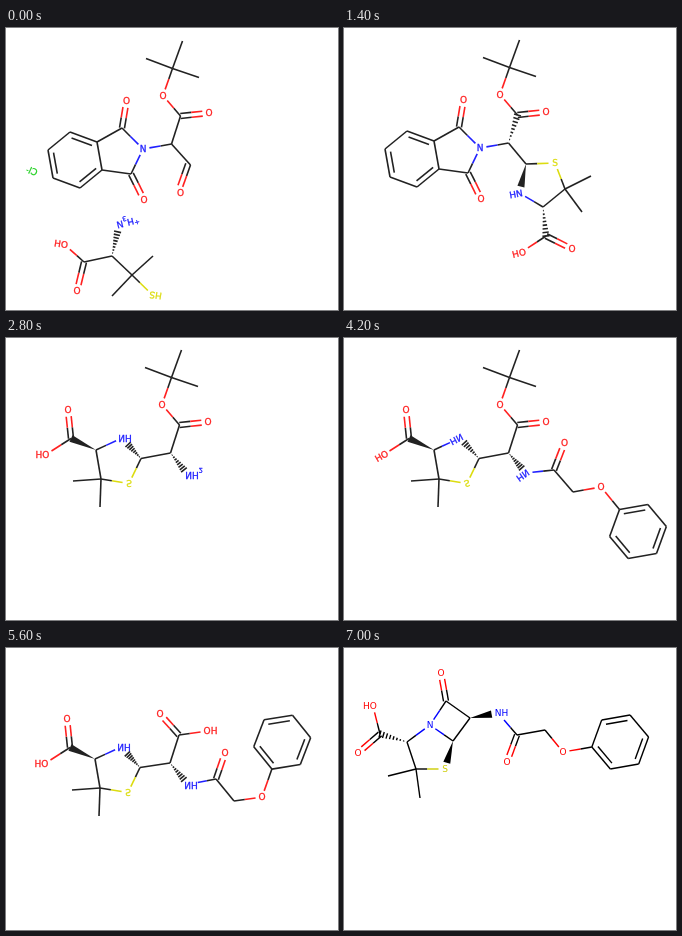
Write an HTML page that moves like this. It is 332x282 px and loops after 8400 ms.

```html
<!DOCTYPE html>
<html lang="en">
<head>
<meta charset="utf-8">
<title>Synthesis steps</title>
<style>
  html, body { margin: 0; width: 100%; height: 100%; overflow: hidden; background: #fff; }
  svg { display: block; width: 100%; height: 100%; }
  text { font: 9px "DejaVu Sans", sans-serif; text-anchor: middle; }
  .soft { stroke-width: 1.6px; filter: blur(0.35px); }
  .soft text { stroke-width: 0.3px; }
  .crisp { stroke-width: 1.4px; }
  .crisp text { stroke: none; }
</style>
</head>
<body>
<svg id="stage" viewBox="0 0 332 282"></svg>
<script>
const STEP = 1400;
const SOFT = { C: '#222', O: '#ff2020', N: '#2020ff', S: '#dcdc10', Cl: '#20d020' };
const CRISP = { C: '#000', O: '#f00', N: '#00f', S: '#cccc00' };

// Atoms are "name x y"; bonds are chains using
// - single, = double, : one-sided double (inset clockwise), < wedge, ! hashed wedge.
const part = (atoms, bonds, dx = 0, dy = 0) => ({
  atoms: atoms.split(',').map(item => {
    const [name, x, y] = item.trim().split(' ');
    return [name, { x: +x + dx, y: +y + dy, el: name.match(/^[A-Z][a-z]?/)[0] }];
  }),
  bonds
});

const ester = (dx, dy) => part(
  'C1 165.5 39.5, C2 175.5 12, C3 139 29.5, C4 192 48.5, O1 156 66.5, C5 173.5 87, O2 202 84, C6 164.5 115',
  'C2-C1-C3 C4-C1-O1-C5=O2', dx, dy);

const phthalimide = (dx, dy) => part(
  'N1 136 120, C10 115 99, O10 119.5 72, C11 124 145, O11 137 171, ' +
  'C12 63 103, C13 90 113, C14 95 141, C15 73 159, C16 46 149, C17 41 121',
  'C6-N1-C10-C13-C14-C11-N1 C10=O10 C11=O11 C12:C13 C14:C15-C16:C17-C12', dx, dy);

const thiazolidine = (dx, dy) => part(
  'C20 135 120.5, N2 116 100, C21 90 112, C22 95 141, S1 123 145.5, ' +
  'C23 67 143, C24 94 169, C25 65 100.5, O20 62 72, O21 40 116.5',
  'C6-C20-S1-C22-C21-N2 C20!N2 C23-C22-C24 C21<C25=O20 C25-O21', dx, dy);

const phenyl = (cx, cy, degrees, firstDouble) => {
  const point = i => {
    const a = (degrees + 60 * i) * Math.PI / 180;
    return `C3${i} ${cx + 28.8 * Math.cos(a)} ${cy + 28.8 * Math.sin(a)}`;
  };
  const sides = [0, 1, 2, 3, 4, 5];
  return part(sides.map(point).join(),
    sides.map(i => `C3${i}${i % 2 === firstDouble ? ':' : '-'}C3${(i + 1) % 6}`).join(' '));
};

// Labels: atom -> [text, dx, dy, angle, vertical flip]; _ lowers and ^ raises a character.
const scenes = [
  {
    parts: [
      ester(1, 1), phthalimide(1, 1),
      part('C7 184.5 137, O3 174.5 165', 'C5-C6-C7:O3'),
      part('C40 106 228, N4 113 197.5, C41 78 234, O40 59 217, O41 71 263, C42 126 247, ' +
           'C43 147 228, C44 106 268, S4 146.5 267',
           'C40!N4 C40-C41=O41 C41-O40 C40-C42-C43 C44-C42-S4'),
      part('Cl1 26 143', '')
    ],
    labels: {
      O40: ['HO', -4, -1, 8], N4: ['^+H_3N', 9, -3, 166],
      S4: ['HS', 3, 0.5, 188], Cl1: ['Cl^-', 0, 0, 205]
    }
  },
  {
    parts: [
      ester(0, 0), phthalimide(0, 0),
      part('C20 182 136, S1 211 135, C22 221 161, C23 247 148, C24 238 184, C21 199 179, ' +
           'N2 175.5 165, C25 202 208, O20 228 221, O21 178.5 223.5',
           'C6!C5 C6-C20-S1-C22-C21-N2 C20<N2 C23-C22-C24 C21!C25=O20 C25-O21')
    ],
    labels: { N2: ['HN', -3.5, 1, -10], O21: ['HO', -3.5, 1.5, -14] }
  },
  {
    parts: [ester(0, 0), thiazolidine(0, 0), part('N3 182 137', 'C5-C6!N3')],
    labels: {
      N2: ['NH', 3, 0, 0, -1], S1: ['S', 0, 0, 0, -1],
      O21: ['HO', -3.5, 0], N3: ['NH_2', 6, 0, 0, -1]
    }
  },
  {
    parts: [
      ester(0, 0), thiazolidine(0, 0), phenyl(294, 193.5, -130, 0),
      part('N3 182 135, C50 210 132, O50 220.5 105, C51 229 154, O51 257 149',
           'C5-C6!N3-C50=O50 C50-C51-O51-C30')
    ],
    labels: {
      N2: ['HN', -3.5, 1.5, -28, -1], S1: ['S', 0, 0, -20, -1],
      O21: ['HO', -2.5, 1.5, -30], N3: ['HN', -3, 2.5, -35, -1]
    }
  },
  {
    parts: [
      thiazolidine(-1, -1), phenyl(276.2, 94.2, 111, 0),
      part('C5 173 87, O1 154 66, O2 201 83, C6 164 115, N3 182 136.5, ' +
           'C50 210 131, O50 219 105, C51 228 153, O51 256 149',
           'C5=O1 C6-C5-O2 C6!N3-C50=O50 C50-C51-O51-C30')
    ],
    labels: {
      N2: ['NH', 3, 0.5, 0, -1], S1: ['S', 0, 0, 0, -1], O21: ['HO', -3.5, 0],
      O2: ['OH', 3.5, 0], N3: ['NH', 3, 0.5, 0, -1]
    }
  },
  {
    crisp: true,
    parts: [
      phenyl(276.2, 94, 170, 1),
      part('O1 97 25, C1 102 53, N1 86 77, C2 126 70, C3 109 93, C4 63 94, C5 72 121, ' +
           'S1 101 121, C6 44 128, C7 76 150, C8 36 86, O2 29 58, O3 14 105, N2 154 65, ' +
           'C50 173 87, O50 163 114, C51 201 82, O51 219 104',
           'O1=C1-N1-C3-C2-C1 N1-C4-C5-S1 C3<S1 C6-C5-C7 C4!C8=O3 C8-O2 ' +
           'C2<N2-C50=O50 C50-C51-O51-C30')
    ],
    labels: { O2: ['HO', -3, 0], N2: ['NH', 3.5, 0] }
  }
];

const line = (x1, y1, x2, y2, color) =>
  `<path d="M${x1} ${y1}L${x2} ${y2}" stroke="${color}"/>`;

// Space kept free around an atom's label, wider on the side the label extends to.
function labelGap(atom, [, dx = 0, dy = 0] = [], ux, uy) {
  return atom.el === 'C' ? 0 : 6.5 + 1.2 * Math.max(0, dx * ux + dy * uy);
}

function drawBond(a, b, type, colors, labelA, labelB) {
  const length = Math.hypot(b.x - a.x, b.y - a.y);
  const ux = (b.x - a.x) / length, uy = (b.y - a.y) / length;
  const start = labelGap(a, labelA, ux, uy);
  const end = length - labelGap(b, labelB, -ux, -uy);
  const at = (along, side) => [a.x + ux * along - uy * side, a.y + uy * along + ux * side];

  const stroke = (side, trim = 0) => {
    const from = at(start + trim, side), to = at(end - trim, side);
    if (a.el === b.el) return line(...from, ...to, colors[a.el]);
    const middle = at((start + end) / 2, side);
    return line(...from, ...middle, colors[a.el]) + line(...middle, ...to, colors[b.el]);
  };

  if (type === '=') return stroke(-2.5) + stroke(2.5);
  if (type === ':') return stroke(0) + stroke(5, a.el === b.el ? 3.5 : 0);
  if (type === '<')
    return `<path d="M${at(start, 0)}L${at(end, 3.6)}L${at(end, -3.6)}Z" fill="${colors.C}"/>`;
  if (type === '!') {
    const bars = 8;
    return Array.from({ length: bars }, (_, i) => {
      const k = (i + 1) / bars;
      const along = start + (end - start) * k;
      return line(...at(along, -3.6 * k), ...at(along, 3.6 * k), colors.C);
    }).join('');
  }
  return stroke(0);
}

function drawLabel(atom, [text, dx = 0, dy = 0, angle = 0, flip = 1], colors) {
  let level = 0;
  const spans = text.replace(/([_^]?)(.)/g, (_, mark, char) => {
    const next = mark === '_' ? 3.5 : mark === '^' ? -3 : 0;
    const shift = next - level;
    level = next;
    return `<tspan dy="${shift}"${mark ? ' font-size="6.5"' : ''}>${char}</tspan>`;
  });
  const color = colors[atom.el];
  return `<text y="3.3" fill="${color}" stroke="${color}" ` +
    `transform="translate(${atom.x + dx} ${atom.y + dy}) rotate(${angle}) scale(1 ${flip})">${spans}</text>`;
}

function drawScene({ parts, labels, crisp }) {
  const colors = crisp ? CRISP : SOFT;
  const atoms = Object.fromEntries(parts.flatMap(p => p.atoms));
  let svg = '';
  for (const chain of parts.map(p => p.bonds).join(' ').split(' ').filter(Boolean)) {
    const tokens = chain.split(/([-=:<!])/);
    for (let i = 0; i + 2 < tokens.length; i += 2) {
      const [from, type, to] = tokens.slice(i, i + 3);
      svg += drawBond(atoms[from], atoms[to], type, colors, labels[from], labels[to]);
    }
  }
  for (const [name, atom] of Object.entries(atoms))
    if (atom.el !== 'C') svg += drawLabel(atom, labels[name] || [atom.el], colors);
  return `<g class="${crisp ? 'crisp' : 'soft'}">${svg}</g>`;
}

const stage = document.getElementById('stage');
const drawings = scenes.map(drawScene);
let shown = -1;

function tick() {
  const index = Math.floor(performance.now() / STEP) % scenes.length;
  if (index !== shown) stage.innerHTML = drawings[shown = index];
  requestAnimationFrame(tick);
}
tick();
</script>
</body>
</html>
```
